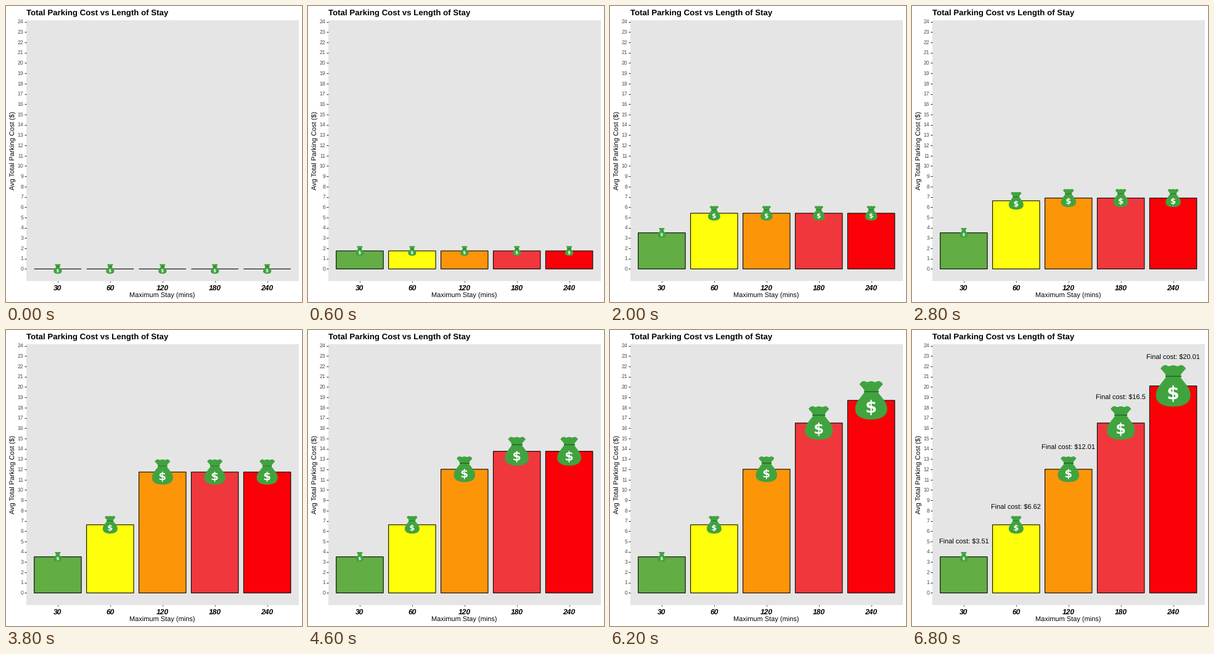
Animation, 480 px wide and 480 px high, one loop 8 s. Source, as a matplotlib script:

```python
import numpy as np
import matplotlib.pyplot as plt
from matplotlib.animation import FuncAnimation
from matplotlib.patches import PathPatch, Rectangle
from matplotlib.path import Path
from matplotlib.textpath import TextPath
from matplotlib.transforms import Affine2D

plt.rcParams["font.family"] = "Liberation Sans"
plt.rcParams["text.hinting"] = "none"

SIZE, DPI = 480, 72  # at 72 dpi one point is one pixel
FRAMES, INTERVAL = 40, 200
FIRST, STAGE = 6, 7  # steps in the first stage and in each later one

# stay, bar height, cost in the label, colour
ROWS = [
    ("30", 3.51, "3.51", "#63AD45"),
    ("60", 6.62, "6.62", "#FFFF0B"),
    ("120", 12.01, "12.01", "#FD9509"),
    ("180", 16.5, "16.5", "#F0373C"),
    ("240", 20.1, "20.01", "#FB0007"),
]
LEVELS = [0] + [row[1] for row in ROWS]
BAG, BAND, AXIS = "#40A33F", "#2B742C", "#333333"

LEFT, RIGHT, TOP, BOTTOM = 33, 474.5, 23, 445.5
STEP = (RIGHT - LEFT) / (len(ROWS) + 0.2)
BAR_W = 0.9 * STEP


def x_px(i):
    return LEFT + STEP * (0.6 + i)


def y_px(value):
    return 426.4 - 16.7 * value


def level(pos):
    return np.interp(pos, range(len(LEVELS)), LEVELS)


def bag_height(pos):
    return 3 + 13 * max(pos, 1)


def progress(frame):
    """Stages finished, with sine easing inside the current one."""
    pos = min(frame / FIRST, 1) + max(frame - FIRST, 0) / STAGE
    pos = min(pos, len(ROWS))
    return int(pos) + (1 - np.cos(np.pi * (pos % 1))) / 2


def bag_parts():
    """Paths and colours of a bag one unit high."""
    half = np.array([
        (0, -33.5),
        (18, -33.5), (28, -27), (28, -15),
        (28, -1), (15, 7), (11.5, 15.5),
        (13, 21), (17, 24), (20.5, 28),
        (18, 33), (13, 35.5), (9, 32.5),
        (6, 31), (4, 33.5), (0, 33.5),
    ]) / 68
    points = np.vstack([half, half[-2::-1] * (-1, 1)])
    body = Path(points, [Path.MOVETO] + [Path.CURVE4] * (len(points) - 1))

    unit = Path.unit_rectangle()
    band = Affine2D().translate(-0.5, -0.5).scale(26 / 68, 2.2 / 68).translate(0, 15.7 / 68)
    sign = TextPath((0, 0), "$", size=1, prop={"family": "DejaVu Sans", "weight": "bold"})
    box = sign.get_extents()
    fit = Affine2D().translate(-(box.x0 + box.x1) / 2, -(box.y0 + box.y1) / 2)
    fit.scale(27 / 68 / box.height).translate(0, -12.5 / 68)
    return [(body, BAG), (band.transform_path(unit), BAND), (fit.transform_path(sign), "white")]


fig = plt.figure(figsize=(SIZE / DPI, SIZE / DPI), dpi=DPI, facecolor="white")
ax = fig.add_axes([0, 0, 1, 1])
ax.set_xlim(0, SIZE)
ax.set_ylim(SIZE, 0)
ax.axis("off")


def put(x, y, text, size, ha="center", **style):
    return ax.text(x, y, text, fontsize=size, ha=ha, va="baseline", **style)


def tick(xs, ys):
    ax.plot(xs, ys, color=AXIS, lw=1.07, solid_capstyle="butt")


ax.add_patch(Rectangle((LEFT, TOP), RIGHT - LEFT, BOTTOM - TOP, fc="#E5E5E5", ec="none"))
put(LEFT, 15, "Total Parking Cost vs Length of Stay", 13.2, "left", weight="bold")
put(253.7, 473, "Maximum Stay (mins)", 11)
put(13.5, 234.5, "Avg Total Parking Cost ($)", 11, rotation=90, rotation_mode="anchor")

for v in range(25):
    tick([LEFT - 2.8, LEFT], [y_px(v)] * 2)
    put(28.2, y_px(v) + 2.8, str(v), 8.8, "right", color="#4D4D4D")

bars, bags, labels = [], [], []
parts = bag_parts()
for i, (stay, value, cost, color) in enumerate(ROWS):
    x = x_px(i)
    tick([x, x], [BOTTOM, BOTTOM + 2.8])
    put(x, 460.6, stay, 12, weight="bold", style="italic")
    bar = Rectangle((x - BAR_W / 2, y_px(0)), BAR_W, 0, fc=color, ec="black",
                    lw=1.07, joinstyle="miter", snap=False, zorder=3)
    bars.append(ax.add_patch(bar))
    bags.append([ax.add_patch(PathPatch(p, fc=c, ec="none", lw=0, zorder=4)) for p, c in parts])
    label_y = y_px(1.25 + 1.08 * value) + 3.2
    labels.append(put(x, label_y, f"Final cost: ${cost}", 11, zorder=5))


def update(frame):
    pos = progress(frame)
    for i in range(len(ROWS)):
        reach = min(pos, i + 1)
        top, height = y_px(level(reach)), bag_height(reach)
        bars[i].set_height(top - y_px(0))
        place = Affine2D().scale(height, -height).translate(x_px(i), top)
        for part in bags[i]:
            part.set_transform(place + ax.transData)
        labels[i].set_visible(pos >= len(ROWS))
    return bars + labels


anim = FuncAnimation(fig, update, frames=FRAMES, interval=INTERVAL, repeat=True, repeat_delay=0)
plt.show()
```
